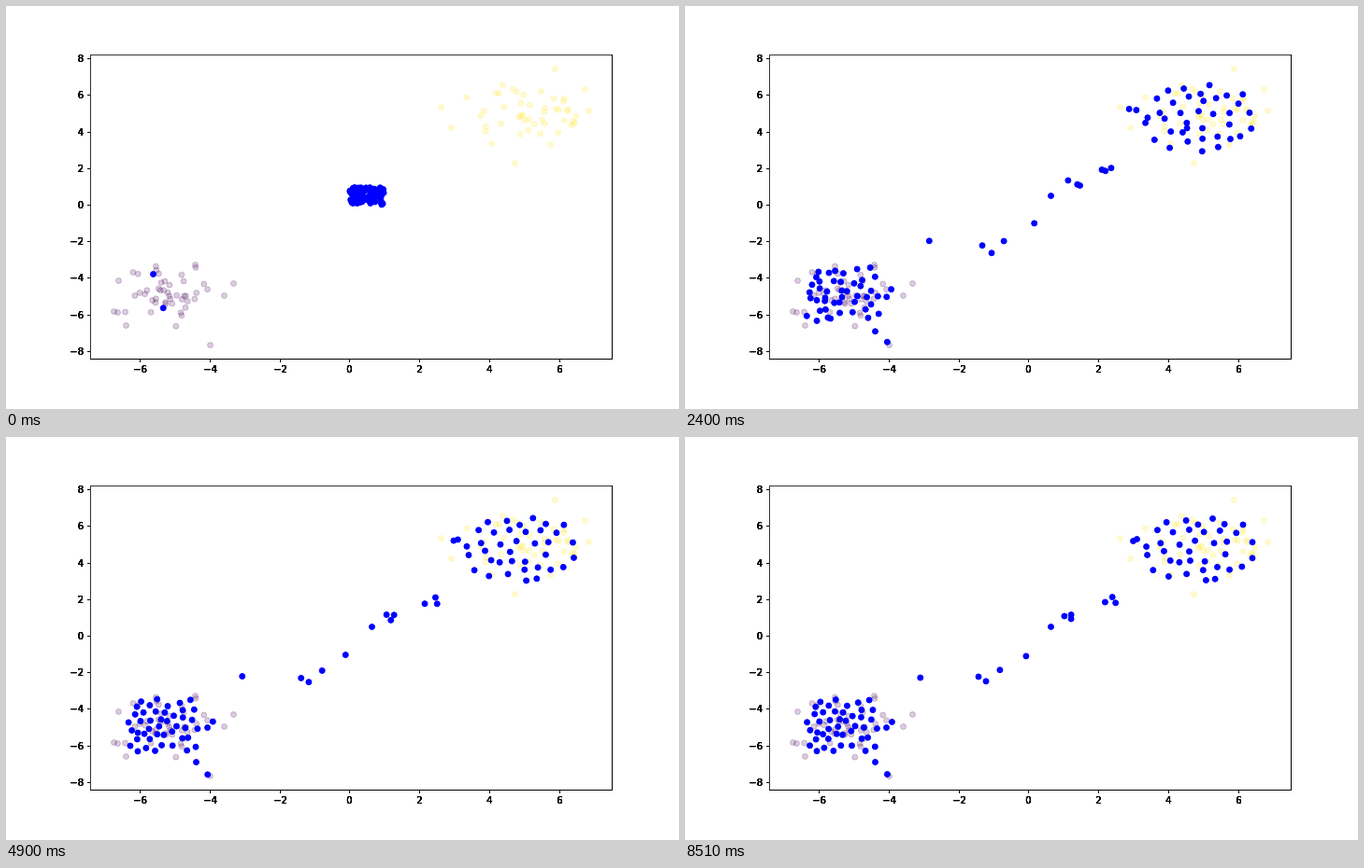
Write an HTML page with a canvas that moves like this. It is 720 px wide and 432 px high and loops after 8.55 s.

```html
<!DOCTYPE html>
<html lang="en">
<head>
<meta charset="utf-8">
<title>Self-organizing map</title>
<style>
html, body { margin: 0; width: 100%; height: 100%; overflow: hidden; background: #fff; }
canvas { display: block; }
</style>
</head>
<body>
<canvas id="stage" width="720" height="432"></canvas>
<script>
const ctx = document.getElementById('stage').getContext('2d');
const LOOP = 8550, STEP = 100, FRAMES = 86;

let seed = 11;
function random() {
  seed = (seed * 16807) % 2147483647;
  return seed / 2147483647;
}
const between = (a, b) => a + (b - a) * random();
const spread = () => between(-1, 1);

// Bell-shaped number, cut off at two deviations
function bell() {
  const v = Math.sqrt(-2 * Math.log(random())) * Math.cos(2 * Math.PI * random());
  return Math.abs(v) < 2 ? v : bell();
}

// Samples: a few far ones fix the outline, the rest are scattered around the centre
function cloud(n, cx, cy, sx, sy, far) {
  const out = far.slice();
  while (out.length < n) out.push([cx + bell() * sx, cy + bell() * sy]);
  return out;
}

// Evenly spread places in a rounded box: of several candidates the loneliest stays
function fillShape(n, cx, cy, rx, ry, power, fixed) {
  const out = fixed.slice();
  while (out.length < n) {
    let best, most = -1;
    for (let i = 0; i < 12; i++) {
      const u = spread(), v = spread();
      if (Math.abs(u) ** power + Math.abs(v) ** power > 1) continue;
      const p = [cx + u * rx, cy + v * ry];
      const room = Math.min(...out.map(q => Math.hypot(p[0] - q[0], p[1] - q[1])));
      if (room > most) { most = room; best = p; }
    }
    if (best) out.push(best);
  }
  return out;
}

const lowData = cloud(50, 174, 311, 28, 17,
  [[218, 363], [115, 327], [119, 328], [120, 294], [243, 297], [233, 310], [202, 277], [128, 342]]);
const highData = cloud(50, 556, 113, 34, 17,
  [[587, 67], [465, 108], [476, 130], [544, 168], [582, 148], [519, 147], [619, 89], [623, 112]]);

const lowHomes = fillShape(48, 168, 309, 38, 30, 5,
  [[216, 361], [203, 348], [221, 305], [215, 311], [205, 312]]);
const highHomes = fillShape(39, 550, 119, 62, 34, 2.4,
  [[479, 111], [483, 109], [493, 117], [494, 126], [517, 149], [557, 153], [564, 87]]);
const bridge = [[251, 258], [313, 256], [321, 261], [336, 249], [364, 234], [391, 203],
  [405, 192], [412, 190], [413, 194], [449, 177], [456, 171], [460, 177]];

// A neuron waits in the unit square, leaves at some step, then wanders
// around its home in ever smaller moves. Returns its place at every step.
function track(home, leave, size, decay) {
  const start = [between(367, 404), between(194, 213)];
  let dx = spread(), dy = spread();
  return Array.from({ length: FRAMES }, (_, f) => {
    if (random() < 0.6 * Math.exp(-f / 14)) { dx = spread(); dy = spread(); }
    if (f < leave) return start;
    const reach = size * Math.exp(-f / decay);
    return [home[0] + dx * reach, home[1] + dy * reach * 0.6];
  });
}

const resting = ([x, y]) => x === 391 && y === 203;
const neurons = [
  ...lowHomes.map((h, i) => track(h, i > 4 && i < 7 ? 0 : between(1, 8), 20, 16)),
  ...highHomes.map(h => track(h, between(1, 8), 20, 16)),
  ...bridge.map(h => track(h, between(4, 20), resting(h) ? 0 : 30, 25))
];

function dot([x, y], color, alpha) {
  ctx.globalAlpha = alpha;
  ctx.fillStyle = ctx.strokeStyle = color;
  ctx.beginPath();
  ctx.arc(x + 0.5, y + 0.5, 3, 0, Math.PI * 2);
  ctx.fill();
  ctx.stroke();
  ctx.globalAlpha = 1;
}

// Overdrawing gives the labels their heavy edges
function label(text, x, y) {
  for (let i = 0; i < 8; i++) ctx.fillText(text, x, y);
}

function drawAxes() {
  ctx.fillStyle = '#333';
  ctx.fillRect(90, 52, 558, 1);
  ctx.fillRect(90, 52, 1, 326);
  ctx.fillStyle = '#000';
  ctx.fillRect(90, 378, 559, 1);
  ctx.fillRect(648, 52, 1, 327);
  ctx.font = '10px "DejaVu Sans", sans-serif';
  for (let v = -8; v <= 8; v += 2) {
    const text = String(v).replace('-', '\u2212');
    const x = Math.round(367.3 + v * 37.37), y = Math.round(213 - v * 19.6);
    ctx.textAlign = 'right';
    ctx.fillRect(87, y, 3, 1);
    label(text, 83, y + 4);
    if (Math.abs(v) > 6) continue;
    ctx.textAlign = 'center';
    ctx.fillRect(x, 379, 1, 3);
    label(text, x + 0.5, 393);
  }
}

function draw(f) {
  ctx.fillStyle = '#fff';
  ctx.fillRect(0, 0, 720, 432);
  ctx.lineWidth = 1;
  lowData.forEach(p => dot(p, '#440154', 0.2));
  highData.forEach(p => dot(p, '#fde725', 0.2));
  neurons.forEach(path => dot(path[f], '#00f', 1));
  drawAxes();
}

const begin = performance.now();
function tick() {
  const t = (performance.now() - begin) % LOOP;
  draw(Math.floor(t / STEP));
  requestAnimationFrame(tick);
}
tick();
</script>
</body>
</html>
```
